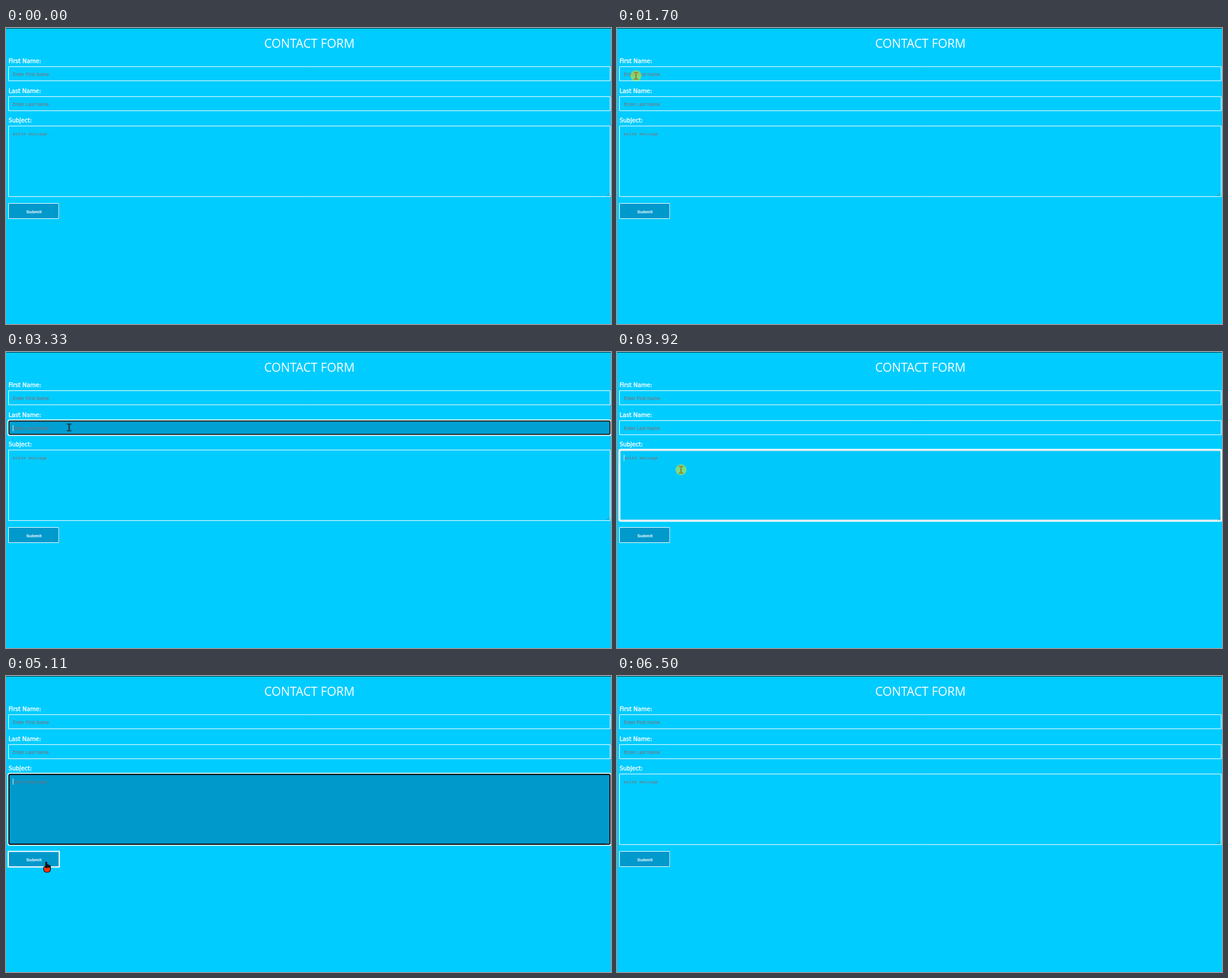
Recreate the animation shown at these times as an HTML page with a canvas. Size 1068 by 524 pixels, loop 6.63 s.

```html
<!DOCTYPE html>
<html lang="en">
<head>
<meta charset="utf-8">
<title>Contact form</title>
<style>
html, body { margin: 0; width: 100%; height: 100%; overflow: hidden; background: #0cf; }
canvas { display: block; }
</style>
</head>
<body>
<canvas id="stage" width="1068" height="524"></canvas>
<script>
const ctx = document.getElementById('stage').getContext('2d');
const LOOP = 6630, BLINK = 530, FADE = 500, CLICK = 170;
const ENTER = 290, LEAVE = 6450;
const TITLE = '21.3px "Open Sans", "Noto Sans", Tahoma, sans-serif';
const LABEL = '10.1px "DejaVu Sans", Verdana, sans-serif';
const INPUT = '8.5px "Liberation Sans", Arial, sans-serif';
const BOLD = 'bold 8px "Liberation Sans", Arial, sans-serif';
const MONO = '7.75px "Noto Sans Mono", Consolas, monospace';
const BLACK = '#0a0a0a', RED = '#f0340c';

// press / on / off: pointer click, focus gained, focus lost
const fields = [
  { label: 'First Name:', hint: 'Enter First Name', h: 26, font: INPUT, press: 1690, on: 1750, off: 3000 },
  { label: 'Last Name:', hint: 'Enter Last Name', h: 26, font: INPUT, press: 2960, on: 3000, off: 3900 },
  { label: 'Subject:', hint: 'write message', h: 126, font: MONO, press: 3860, on: 3900, off: LEAVE }
];
fields.forEach((f, i) => { f.y = Math.round(68 + 52.6 * i); });
const button = { x: 4, y: 310, w: 90, h: 28 };

// pointer moves; it rests between them
const entry = { x: 940, y: 453 };
const moves = [
  { from: ENTER, to: 950, x: 1, y: 164 },
  { from: 1000, to: 1400, x: 33.5, y: 84.5 },
  { from: 2050, to: 2550, x: 124, y: 102 },
  { from: 2550, to: 2850, x: 111.5, y: 133.5 },
  { from: 3500, to: 3860, x: 113, y: 208.5 },
  { from: 4200, to: 4510, x: 92, y: 309 },
  { from: 4570, to: 5050, x: 71, y: 329 },
  { from: 5490, to: 5870, x: 844, y: 514 }
];

const within = (v, a, b) => v >= a && v < b;
const mix = (a, b, k) => a + (b - a) * k;
const clamp = k => Math.min(1, Math.max(0, k));
const smooth = k => k * k * (3 - 2 * k);
const easeOut = k => 1 - Math.pow(1 - k, 1.8);

function pointerAt(t) {
  if (!within(t, ENTER, LEAVE)) return null;
  let { x, y } = entry;
  for (const m of moves) {
    const k = smooth(clamp((t - m.from) / (m.to - m.from)));
    x = mix(x, m.x, k);
    y = mix(y, m.y, k);
  }
  return { x, y };
}

function text(str, x, y, font, color, weight = 0) {
  ctx.font = font;
  ctx.fillStyle = ctx.strokeStyle = color;
  ctx.fillText(str, x, y);
  if (weight) {
    ctx.lineWidth = weight;
    ctx.strokeText(str, x, y);
  }
}

function box(x, y, w, h, color) {
  ctx.fillStyle = color;
  ctx.fillRect(x, y, w, h);
}

function ring(x, y, w, h, r, color, width) {
  ctx.strokeStyle = color;
  ctx.lineWidth = width;
  ctx.beginPath();
  ctx.roundRect(x, y, w, h, r);
  ctx.stroke();
}

function drawField(f, t) {
  const { y, h } = f, base = y + 16.5;
  text(f.label, 4.5, y - 6.5, LABEL, '#fff', 0.4);
  const focused = within(t, f.on, f.off);
  if (focused) {
    const k = easeOut(clamp((t - f.on) / FADE));
    const shade = Math.round(255 * (1 - k));
    box(4, y, 1063, h, `rgb(0,${mix(204, 153, k)},${mix(255, 204, k)})`);
    ring(3.6, y - 0.4, 1064, h + 0.8, 3, '#fff', 2);
    ring(5.2, y + 1.2, 1061, h - 2.4, 2, `rgb(${shade},${shade},${shade})`, 2);
  } else {
    ring(4.5, y + 0.5, 1062, h - 1, 0, '#fff', 1);
  }
  text(f.hint, 12, base, f.font, '#8b686a');
  if (focused && Math.floor((t - f.on) / BLINK) % 2 === 0) box(12, base - 8, 1, 11, '#d5f2fb');
}

// resize handle of the message box
function drawGrip() {
  ctx.strokeStyle = '#5a8795';
  ctx.lineWidth = 0.9;
  ctx.beginPath();
  for (const d of [6, 2.5]) {
    ctx.moveTo(1066 - d, 298);
    ctx.lineTo(1066, 298 - d);
  }
  ctx.stroke();
}

function drawButton(hover) {
  const { x, y, w, h } = button;
  box(x, y, w, h, '#09c');
  if (hover) ring(x, y + 0.5, w, h - 0.5, 0, '#fff', 2.2);
  else ring(x + 0.5, y + 0.5, w - 1.5, h - 1, 0, '#fff', 1);
  text('Submit', 35.7, 328, BOLD, '#fff');
}

function drawBeam(clicked) {
  const color = clicked ? '#948a32' : '#1d414c';
  box(-1.3, -5, 2.6, 10, color);
  for (const y of [-7, 4.8]) box(-4, y, 8, 2.2, color);
}

function drawArrow() {
  const outline = new Path2D('M.5 .5V12L3 9.8 5 14.5 7 13.6 5 9 8 8.6Z');
  ctx.fillStyle = RED;
  ctx.fill(outline);
  ctx.strokeStyle = BLACK;
  ctx.lineWidth = 1.1;
  ctx.stroke(outline);
}

function drawHand() {
  ctx.fillStyle = RED;
  ctx.beginPath();
  ctx.roundRect(-4.5, 8.5, 12, 10, [2, 1, 5, 5]);
  ctx.fill();
  ring(-4.5, 8.5, 12, 10, [2, 1, 5, 5], BLACK, 1.1);
  box(-1.6, 0, 3.2, 11, BLACK);
  for (let i = 0; i < 3; i++) box(1.4 + 2.1 * i, 4.3 + i, 2.2, 6 - i, BLACK);
}

function drawPointer(p, kind, t) {
  const clicked = fields.some(f => within(t, f.press, f.press + CLICK));
  ctx.save();
  ctx.translate(p.x, p.y);
  if (clicked) {
    ctx.fillStyle = 'rgba(255,240,0,.47)';
    ctx.beginPath();
    ctx.arc(0, 0, 9.7, 0, Math.PI * 2);
    ctx.fill();
  }
  if (kind === 'beam') drawBeam(clicked);
  else if (kind === 'hand') drawHand();
  else drawArrow();
  ctx.restore();
}

function kindAt(p) {
  if (!p) return '';
  if (within(p.x, 4, 1067) && fields.some(f => within(p.y, f.y, f.y + f.h))) return 'beam';
  const { x, y, w, h } = button;
  return within(p.x, x, x + w) && within(p.y, y, y + h) ? 'hand' : 'arrow';
}

function draw(t) {
  const p = pointerAt(t), kind = kindAt(p);
  box(0, 0, 1068, 524, '#0cf');
  box(0, 0, 1068, 1, '#05303c');
  ctx.textAlign = 'center';
  text('CONTACT FORM', 535.5, 34.6, TITLE, '#fff');
  ctx.textAlign = 'left';
  fields.forEach(f => drawField(f, t));
  drawGrip();
  drawButton(kind === 'hand');
  if (p) drawPointer(p, kind, t);
}

const start = performance.now();
function tick() {
  draw((performance.now() - start) % LOOP);
  requestAnimationFrame(tick);
}
tick();
</script>
</body>
</html>
```
